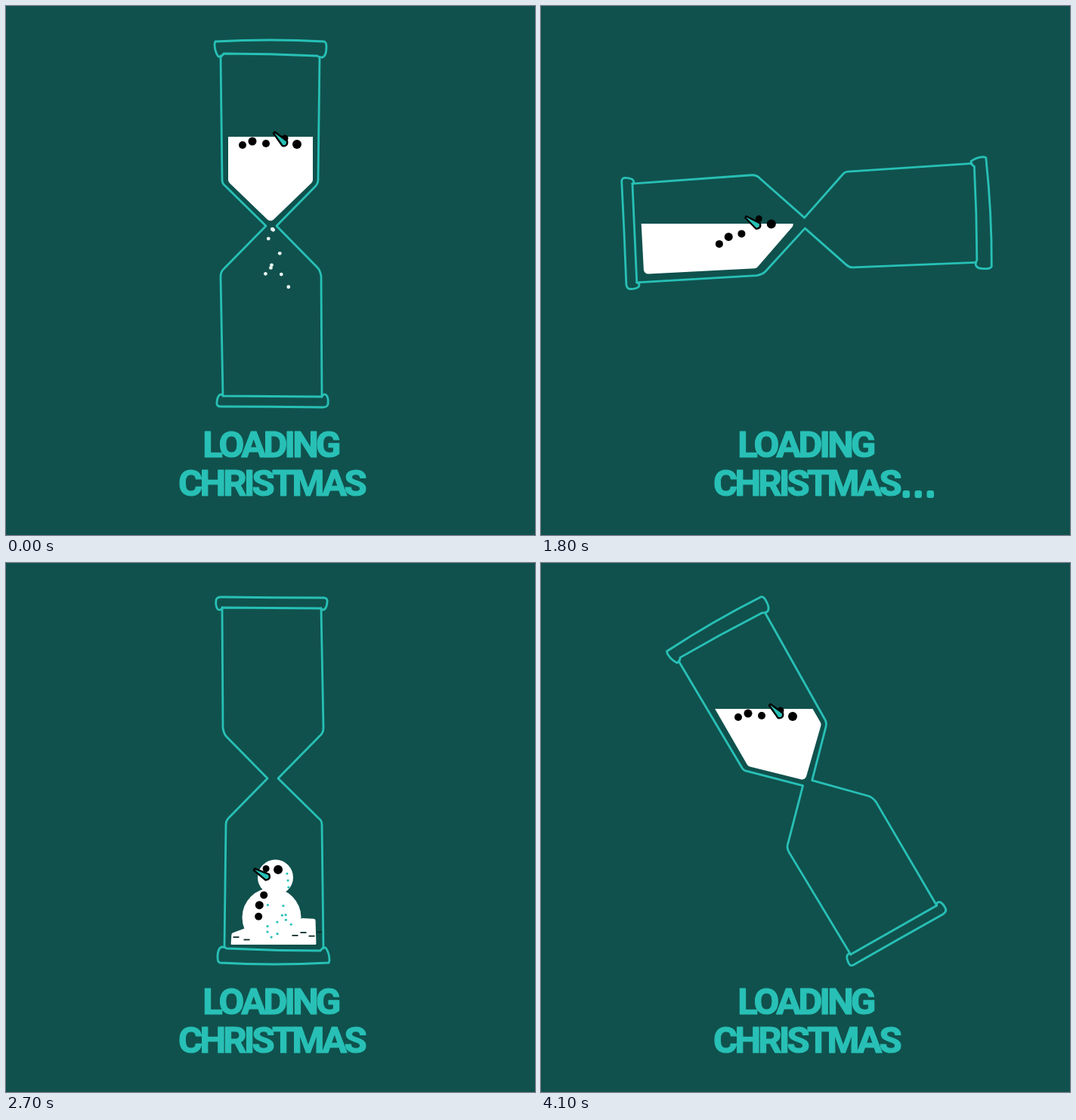
Write an HTML page with a canvas that moves like this. It is 700 by 700 pixels and loops after 4200 ms.

```html
<!DOCTYPE html>
<html lang="en">
<head>
<meta charset="utf-8">
<title>Loading Christmas</title>
<style>
html, body { margin: 0; width: 100%; height: 100%; overflow: hidden; background: #10514d; }
canvas { display: block; }
</style>
</head>
<body>
<canvas id="stage" width="700" height="700"></canvas>
<script>
const c = document.getElementById('stage').getContext('2d');
const BG = '#10514d', TEAL = '#28c0b6', CX = 352, CY = 288;

// Three buttons, two eyes and the carrot's base: on the snowman,
// and afloat as offsets from the middle of the snow surface.
const MAN = [[339,469], [338,454], [342,440], [340,405], [356,404], [346,417]];
const FLOAT = [[-39,11], [-26,6], [-8,9], [17,2], [33,10], [19,11]];
const RADII = [5, 5.5, 5, 4.5, 6];

const rad = deg => deg * Math.PI / 180;
const mix = (a, b, q) => a + (b - a) * q;

function rnd(n) {
  const v = Math.sin(n * 127.1 + 3.7) * 43758.5453;
  return v - Math.floor(v);
}

function rotate([x, y], deg, cx, cy) {
  const s = Math.sin(rad(deg)), k = Math.cos(rad(deg));
  return [cx + (x - cx) * k - (y - cy) * s, cy + (x - cx) * s + (y - cy) * k];
}

function dot(x, y, r, color) {
  c.fillStyle = color;
  c.beginPath();
  c.arc(x, y, r, 0, 7);
  c.fill();
}

function roundPoly(pts, r) {
  const n = pts.length, [a, b] = pts;
  c.beginPath();
  c.moveTo((a[0] + b[0]) / 2, (a[1] + b[1]) / 2);
  for (let i = 1; i <= n; i++) c.arcTo(...pts[i % n], ...pts[(i + 1) % n], r);
  c.closePath();
}

function spin(deg) {
  c.translate(CX, CY);
  c.rotate(rad(deg));
  c.translate(-CX, -CY);
}

const GLASS = [
  'M277 47Q350 43 421 47Q424 48 424 54Q424 67 418 68Q414 68 412 66Q350 63 288 63Q285 68 281 67Q276 60 276 50Z',
  'M284 66L286 230Q286 235 290 238L344 291L289 347Q284 351 284 358L287 516',
  'M415 68L413 230Q413 235 409 239L358 291L412 346Q416 350 417 358L418 517',
  'M287 516L418 517Q420 512 424 515Q427 519 426 527Q425 531 419 531Q350 530 284 530Q278 530 279 524Q280 514 285 514Q287 514 287 516'
].map(d => new Path2D(d));

function glass(deg) {
  c.save();
  spin(deg);
  c.strokeStyle = TEAL;
  c.lineWidth = 2.8;
  c.lineJoin = c.lineCap = 'round';
  GLASS.forEach(p => c.stroke(p));
  c.restore();
}

// Snow filling one chamber, turned by deg, up to a flat surface.
function snow(half, deg, level) {
  const x = 351.5 + half * 2.5, up = half * 14.5;
  c.save();
  c.save();
  spin(deg);
  roundPoly([[x-56,507], [x+56,507], [x+56,358-up], [x,304-up], [x-56,358-up]], 6);
  c.restore();
  c.clip();
  c.fillStyle = '#fff';
  c.fillRect(0, level, 700, 700);
  c.restore();
}

function manPose(half) {
  return {
    pts: MAN.map(p => rotate(p, half * 8, 346, 432 + half * 2)),
    angle: 8 + half * 22
  };
}

function tiltPose(half, deg) {
  const { pts, angle } = manPose(half);
  const slide = ([x, y], i) => [x + 4 + 4.5 * Math.min(i, 3), y + 15 - 18 * half];
  return {
    pts: pts.map((p, i) => slide(rotate(p, deg, CX, CY), i)),
    angle: angle + deg + 20
  };
}

function floatPose(half, mid, level, squeeze = 1) {
  const wide = squeeze * (1 + half * 0.13);
  return {
    pts: FLOAT.map(([x, y]) => [mid + x * wide, level + y]),
    angle: 45 - half * 27
  };
}

function pieces({ pts, angle }) {
  RADII.forEach((r, i) => dot(...pts[i], r, '#000'));
  c.save();
  c.translate(...pts[5]);
  c.rotate(rad(angle));
  c.beginPath();
  c.moveTo(-23, -1.5);
  c.lineTo(-3, -4.5);
  c.quadraticCurveTo(3, 0, -3, 4.5);
  c.lineTo(-23, 1);
  c.closePath();
  c.fillStyle = TEAL;
  c.strokeStyle = '#000';
  c.lineWidth = 2.4;
  c.lineJoin = 'round';
  c.fill();
  c.stroke();
  c.restore();
}

function snowman(half, grown) {
  c.save();
  c.beginPath();
  c.rect(250, 505 - 113 * grown, 200, 113 * grown);
  c.clip();
  c.save();
  c.translate(half * 2.5, 0);
  dot(354, 416, 23.5, '#fff');
  dot(349, 469, 39, '#fff');
  roundPoly([[295,506], [296,490], [315,483], [386,474], [388,470], [407,471], [408,506]], 3);
  c.fill();
  for (let i = 0; i < 11; i++) {
    dot(343 + 40 * rnd(i), 452 + 44 * rnd(i + 20), 1.6, TEAL);
  }
  for (let i = 0; i < 3; i++) dot(369 + 3 * rnd(i), 411 + 9 * i, 1.6, TEAL);
  c.fillStyle = '#0b2b29';
  for (let i = 0; i < 6; i++) {
    c.fillRect(i < 2 ? 298 + 14 * i : 354 + 11 * i, 486 + 14 * rnd(i + 40), 8, 1.8);
  }
  c.restore();
  if (grown > 0.8) pieces(manPose(half));
  c.restore();
}

function flakes(half, step) {
  const floor = 500 - 113 * step / 6;
  for (let i = 0; i < 10 + step * 5; i++) {
    const y = 294 - half * 4 + (98 + 50 * step) * rnd(i);
    const x = 353 + (y - 290) * 0.65 * (rnd(i + 50) - 0.5);
    if (y < floor) dot(x, y, 2.4, '#e8f4f0');
  }
}

function drain(half, step) {
  const p = step / 6, level = 173 - half * 15 + 112 * p;
  snow(1 - half, 180, level);
  if (p < 0.8) {
    pieces(floatPose(half, 352 + half * 2, level, Math.min(1, (1 - p) * 2.24)));
  }
  if (step) snowman(half, p);
  if (step || !half) flakes(half, step);
}

function surface(half, deg) {
  const k = Math.cos(rad(deg));
  return 288 + k * (127 + 20 * k) - (1 - half) * 7 * (1 - k);
}

function tumble(half, step, first, deg) {
  const q = step / 4, level = surface(half, deg), sunk = level - surface(half, first);
  const from = tiltPose(half, first);
  const to = floatPose(1 - half, CX - 104 * Math.sin(rad(deg)), level);
  const [eyeX, eyeY] = from.pts[4];
  snow(half, deg, level);
  if (!step) dot(eyeX - 8, eyeY + 7, 23, '#fff');
  pieces({
    pts: from.pts.map(([x, y], i) => [mix(x, to.pts[i][0], q), mix(y + sunk, to.pts[i][1], q)]),
    angle: mix(from.angle, to.angle, q)
  });
}

function caption(dots) {
  c.font = '700 49px Roboto, "Liberation Sans", sans-serif';
  c.letterSpacing = '-3.7px';
  c.textAlign = 'center';
  c.fillStyle = c.strokeStyle = TEAL;
  c.lineWidth = 1.2;
  c.lineJoin = 'round';
  [['LOADING', 350, 597.4], ['CHRISTMAS', 351, 648]].forEach(line => {
    c.fillText(...line);
    c.strokeText(...line);
  });
  for (let i = 0; i < dots; i++) {
    c.beginPath();
    c.roundRect(478.5 + i * 16, 641, 9.5, 10, 3);
    c.fill();
  }
}

function draw(now) {
  const t = now % 4200, half = t < 2100 ? 0 : 1, u = t - half * 2100;
  const step = Math.floor(u < 600 ? u / 100 : u < 1600 ? 6 : 7 + (u - 1600) / 100);
  const stride = 31 - half, first = 180 - 5 * stride;
  const turn = step < 7 ? 0 : first + (step - 7) * stride;

  c.fillStyle = BG;
  c.fillRect(0, 0, 700, 700);
  if (step < 6) drain(half, step);
  else if (step === 6) snowman(half, 1);
  else tumble(half, step - 7, first, turn);
  glass(half * 180 + turn);
  caption(Math.min(3, step % 6) * (step % 6 < 5));
}

const begin = performance.now();
function loop() {
  draw(performance.now() - begin);
  requestAnimationFrame(loop);
}
loop();
</script>
</body>
</html>
```
